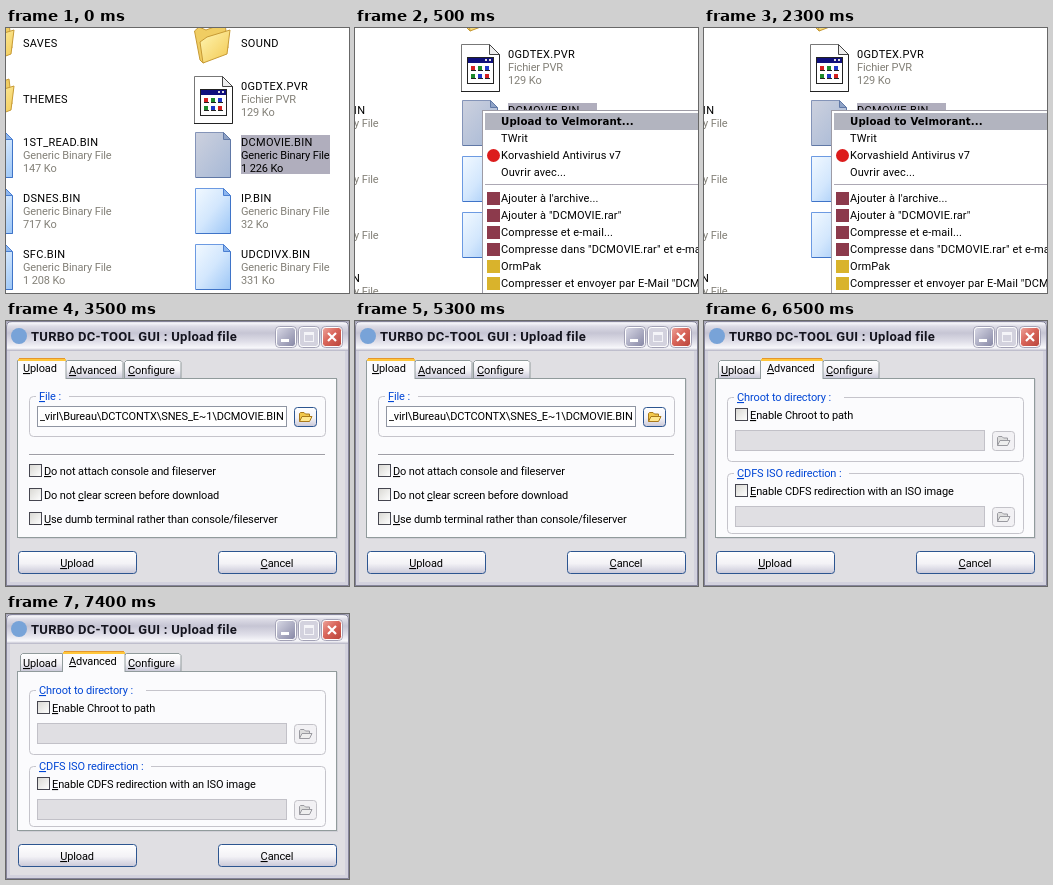
Animation of 343 by 265 pixels, one loop 8000 ms. Source, as an HTML page:

```html
<!DOCTYPE html>
<html lang="fr">
<head>
<meta charset="utf-8">
<title>Upload file</title>
<style>
html, body { margin: 0; width: 100%; height: 100%; overflow: hidden; background: #fff; }
svg { display: block; width: 343px; height: 265px; }
text { font: 11px Roboto, "Open Sans", sans-serif; letter-spacing: -.12px; white-space: pre; }
.caps { letter-spacing: .3px; }
.menu text { letter-spacing: .12px; }
.sub { fill: #838078; }
.blue { fill: #0046d5; }
.menu .bold { font: bold 10.2px "DejaVu Sans", sans-serif; }
.title { font: bold 13px Roboto, sans-serif; letter-spacing: .27px; fill: #14141e; }
.key { text-decoration: underline; }
</style>
</head>
<body>
<svg id="stage" viewBox="0 0 343 265">
  <defs>
    <linearGradient id="page" x2="1" y2="1">
      <stop stop-color="#f2f9ff"/><stop offset=".5" stop-color="#d3e7fd"/><stop offset="1" stop-color="#9cc6f6"/>
    </linearGradient>
    <linearGradient id="dimPage" x2="1" y2="1">
      <stop stop-color="#cdd1de"/><stop offset="1" stop-color="#a6b8d6"/>
    </linearGradient>
    <linearGradient id="gold" x2="1" y2="1">
      <stop stop-color="#fff6b4"/><stop offset="1" stop-color="#f2c850"/>
    </linearGradient>
    <linearGradient id="bar" x2="0" y2="1">
      <stop stop-color="#8b8a9e"/><stop offset=".06" stop-color="#f8f8fc"/><stop offset=".17" stop-color="#dddce6"/>
      <stop offset=".4" stop-color="#c6c5d4"/><stop offset=".68" stop-color="#dfdee8"/>
      <stop offset=".9" stop-color="#f8f8fb"/><stop offset="1" stop-color="#b3b2c3"/>
    </linearGradient>
    <linearGradient id="steel" x2="1" y2="1">
      <stop stop-color="#d9d9e6"/><stop offset="1" stop-color="#8586a4"/>
    </linearGradient>
    <linearGradient id="red" x2="1" y2="1">
      <stop stop-color="#eda69e"/><stop offset=".45" stop-color="#d9655a"/><stop offset="1" stop-color="#b9443a"/>
    </linearGradient>
    <linearGradient id="btn" x2="0" y2="1">
      <stop stop-color="#fff"/><stop offset=".55" stop-color="#f3f2f6"/><stop offset="1" stop-color="#c9c8d8"/>
    </linearGradient>
    <linearGradient id="check" x2="1" y2="1">
      <stop stop-color="#d8d7d2"/><stop offset="1" stop-color="#fff"/>
    </linearGradient>
    <clipPath id="field"><rect x="33" y="86" width="247" height="18"/></clipPath>
  </defs>
</svg>
<script>
const LOOP = 8000;
const stage = document.getElementById('stage');

// "&" underlines the character that follows it
const label = s => s.replace(/&(.)/, '<tspan class="key">$1</tspan>');
const text = (x, y, s, cls = '', extra = '') => `<text x="${x}" y="${y}" class="${cls}" ${extra}>${label(s)}</text>`;
const rect = (x, y, w, h, fill, extra = '') => `<rect x="${x}" y="${y}" width="${w}" height="${h}" fill="${fill}" ${extra}/>`;
const frame = (x, y, w, h, fill, stroke, r = 0) =>
  rect(x + .5, y + .5, w - 1, h - 1, fill, `stroke="${stroke}" rx="${r}"`);
const path = (d, fill, stroke = 'none', extra = '') => `<path d="${d}" fill="${fill}" stroke="${stroke}" ${extra}/>`;
const at = (x, y, body) => `<g transform="translate(${x} ${y})">${body}</g>`;

// Explorer view
const folder = (x, y) => at(x, y,
  path('M.5 3L5 -1L12 2L31 -5L34 20L9 35L6 32Z', '#f0cd62', '#c79a34') +
  path('M6 14L13 9L36 2L33 26L9 35Z', 'url(#gold)', '#c79a34'));

const page = (x, y, dim) => at(x, y,
  path('M.5 .5H28.5L35.5 7.5V45.5H.5Z', dim ? 'url(#dimPage)' : 'url(#page)', dim ? '#8494b8' : '#6c9ae2') +
  path('M35.5 8V45.5H1', 'none', dim ? '#6078a6' : '#3f74c8') +
  path('M28.5 .5V7.5H35.5Z', dim ? '#8fa3c6' : '#8db6ee', dim ? '#6078a6' : '#4a7fd2'));

function pictureFile(x, y) {
  const colors = ['#d42020', '#1d8a2c', '#2038c8'];
  let dots = '';
  for (let i = 0; i < 6; i++) {
    const dx = 10 + i % 3 * 7, dy = 22 + (i / 3 | 0) * 8;
    dots += rect(dx, dy, 4, 4, colors[(i + (i / 3 | 0)) % 3]) + rect(dx, dy + 4, 5, 1, '#222');
  }
  return at(x, y,
    path('M.5 .5H28.5L38.5 10.5V47.5H.5Z', '#fff', '#777') +
    path('M38.5 10V47.5H0', 'none', '#222') +
    path('M28.5 .5V10.5H38.5Z', '#eee', '#444') +
    frame(6, 13, 27, 27, '#fff', '#222') + rect(7, 14, 25, 5, '#10107c') +
    rect(24, 15, 2, 2, '#ddd') + rect(28, 15, 2, 2, '#ddd') + dots);
}

const entry = (x, y, name, type, size, on) =>
  (on ? rect(x, y - 11, 89, 39, '#b0aebd') : '') +
  text(x, y, name, 'caps') +
  text(x, y + 13, type, on ? '' : 'sub') + text(x, y + 26, size, on ? '' : 'sub');

const binary = (x, y, name, size, on) =>
  page(x - 46, y - 14, on) + entry(x, y, name, 'Generic Binary File', size, on);

const view =
  folder(-28, 0) + text(17, 19, 'SAVES', 'caps') +
  folder(-28, 56) + text(17, 75, 'THEMES', 'caps') +
  binary(17, 118, '1ST_READ.BIN', '147 Ko') +
  binary(17, 174, 'DSNES.BIN', '717 Ko') +
  binary(17, 230, 'SFC.BIN', '1 208 Ko') +
  text(79, 286, 'N') + text(17, 299, 'Generic Binary File', 'sub') +
  folder(188, 0) + text(235, 19, 'SOUND', 'caps') +
  pictureFile(188, 48) + entry(235, 62, '0GDTEX.PVR', 'Fichier PVR', '129 Ko') +
  binary(235, 118, 'DCMOVIE.BIN', '1 226 Ko', true) +
  binary(235, 174, 'IP.BIN', '32 Ko') +
  binary(235, 230, 'UDCDIVX.BIN', '331 Ko');

// Context menu
const item = (y, s) => text(146, y, s);
const archiveItem = (y, s, color) => rect(132, y - 10, 13, 13, color) + item(y, s);
const menu = '<g class="menu">' +
  frame(127, 82, 230, 200, '#fff', '#9d9ba5') +
  rect(130, 85, 213, 17, '#b2b4bf') +
  text(146, 97, 'Upload to Velmorant...', 'bold') +
  item(114, 'TWrit') +
  '<circle cx="138.5" cy="127.5" r="6.5" fill="#dc1c1c"/>' +
  item(131, 'Korvashield Antivirus v7') +
  item(148, 'Ouvrir avec...') +
  rect(130, 156, 213, 1, '#aca8b4') +
  ["Ajouter à l'archive...", 'Ajouter à "DCMOVIE.rar"', 'Compresse et e-mail...',
    'Compresse dans "DCMOVIE.rar" et e-mail'].map((s, i) => archiveItem(174 + 17 * i, s, '#8c3a4c')).join('') +
  archiveItem(242, 'OrmPak', '#d9b32c') +
  archiveItem(259, 'Compresser et envoyer par E-Mail "DCMOVIE.zip"', '#d9b32c') + '</g>';

// Dialog
const button = (x, s) =>
  frame(x, 230, 119, 23, 'url(#btn)', '#2c5590', 3) +
  text(x + 59, 246, s, '', 'text-anchor="middle"');

const check = (y, x, s) =>
  frame(x, y, 13, 13, 'url(#check)', '#45454f') + text(x + 15, y + 11, s);

const browse = (y, on) =>
  frame(288, y, 23, 20, on ? 'url(#btn)' : '#f2f1f4', on ? '#2c5590' : '#c3c2c8', 3) +
  at(293, y + 5,
    path('M.5 9.5V1.5L1.5 .5H5L6.5 2H10.5V4', on ? '#f2c84b' : '#ddd', on ? '#a9791a' : '#9a9aa0') +
    path('M.5 9.5L3 4.5H13L10.5 9.5Z', on ? '#ffe78d' : '#eee', on ? '#a9791a' : '#9a9aa0'));

const group = (y, h, s, w) =>
  frame(23, y, 297, h, 'none', '#c5c4cb', 4) + rect(30, y - 1, w, 3, '#fbfbfd') + text(33, y + 4, s, 'blue');

const input = (y, on) => frame(31, y, 250, 21, on ? '#fff' : '#e0dfe3', on ? '#8f95a2' : '#c2c1c8');

const tabs = [['&Upload', 14, 44, 17], ['&Advanced', 59, 58, 63], ['&Configure', 118, 57, 122]];
const tab = ([s, x, w, tx], on) => on
  ? path(`M${x - 2.5} 58V39.5L${x - .5} 37.5H${x + w}L${x + w + 2} 39.5V58`, '#fbfbfd', '#919b9c') +
    rect(x - 1, 37, w + 2, 1, '#e5972d') + rect(x - 2, 38, w + 4, 2, '#ffc73c') +
    text(tx, 51, s)
  : path(`M${x + .5} 57.5V41.5L${x + 2.5} 39.5H${x + w - 2}L${x + w} 41.5V57.5Z`, 'url(#btn)', '#919b9c') +
    text(tx, 53, s);

const sheet = active =>
  tabs.map((t, i) => i === active ? '' : tab(t)).join('') +
  rect(13, 58, 319, 160, '#d0cfd6') + frame(11, 57, 320, 160, '#fbfbfd', '#919b9c') +
  tab(tabs[active], true);

const caption = (x, fill) =>
  rect(x - .5, 5.5, 21, 21, 'none', 'stroke="#a3a2b6" rx="4"') +
  rect(x + .5, 6.5, 19, 19, fill, 'stroke="#fff" rx="3"');

const dialog =
  rect(0, 0, 343, 265, '#a9a8ba') + rect(1, 28, 341, 236, '#d3d2de') +
  path('M0 30V6Q0 0 6 0H337Q343 0 343 6V30Z', 'url(#bar)') +
  rect(4, 30, 335, 231, '#e0dfe3') +
  path('M.5 265V6Q.5 .5 6 .5H337Q342.5 .5 342.5 6V264.5H0', 'none', '#85849a') +
  '<circle cx="13" cy="15" r="8" fill="#78a3d8"/>' +
  text(25, 20, 'TURBO DC-TOOL GUI : Upload file', 'title') +
  caption(270, 'url(#steel)') + rect(275, 18, 8, 3, '#fff') +
  caption(293, '#d3d2de') + frame(298, 11, 10, 10, 'none', '#f4f4f8') + rect(298, 11, 10, 3, '#f4f4f8') +
  caption(316, 'url(#red)') + path('M322 12L330 20M330 12L322 20', 'none', '#fff', 'stroke-width="2.2"') +
  button(12, '&Upload') + button(212, '&Cancel');

const uploadSheet = sheet(0) +
  group(75, 41, '&File :', 33) + input(85, true) +
  `<g clip-path="url(#field)">${text(34, 99, '_virl\\Bureau\\DCTCONTX\\SNES_E~1\\DCMOVIE.BIN')}</g>` +
  browse(86, true) +
  rect(23, 133, 296, 1, '#9f9ea6') + rect(23, 134, 296, 1, '#fff') +
  check(143, 23, '&Do not attach console and fileserver') +
  check(167, 23, 'Do not &clear screen before download') +
  check(191, 23, '&Use dumb terminal rather than console/fileserver');

const advancedSheet = sheet(1) +
  group(76, 65, '&Chroot to directory :', 110) +
  check(87, 31, '&Enable Chroot to path') + input(109) + browse(110) +
  group(152, 61, '&CDFS ISO redirection :', 115) +
  check(163, 31, '&Enable CDFS redirection with an ISO image') + input(185) + browse(186);

// Timeline: content, start and end in ms
const scenes = [
  [view, 0, 3500],
  [menu, 500, 3500],
  [dialog, 3500, LOOP],
  [uploadSheet, 3500, 6500],
  [advancedSheet, 6500, LOOP]
];
const timing = { duration: LOOP, iterations: Infinity };

const layers = scenes.map(([body, from, to]) => {
  const g = document.createElementNS(stage.namespaceURI, 'g');
  g.innerHTML = body;
  stage.append(g);
  const a = from / LOOP, b = to / LOOP;
  const steps = [{ opacity: 1, offset: a }, { opacity: 1, offset: b }];
  if (a > 0) steps.unshift({ opacity: 0, offset: 0 }, { opacity: 0, offset: a });
  if (b < 1) steps.push({ opacity: 0, offset: b }, { opacity: 0, offset: 1 });
  g.animate(steps, timing);
  return g;
});

const jump = 500 / LOOP, home = 'translate(0px, 0px)', scrolled = 'translate(-82px, -32px)';
layers[0].animate([
  { transform: home, offset: 0 }, { transform: home, offset: jump },
  { transform: scrolled, offset: jump }, { transform: scrolled, offset: 1 }
], timing);
</script>
</body>
</html>
```
